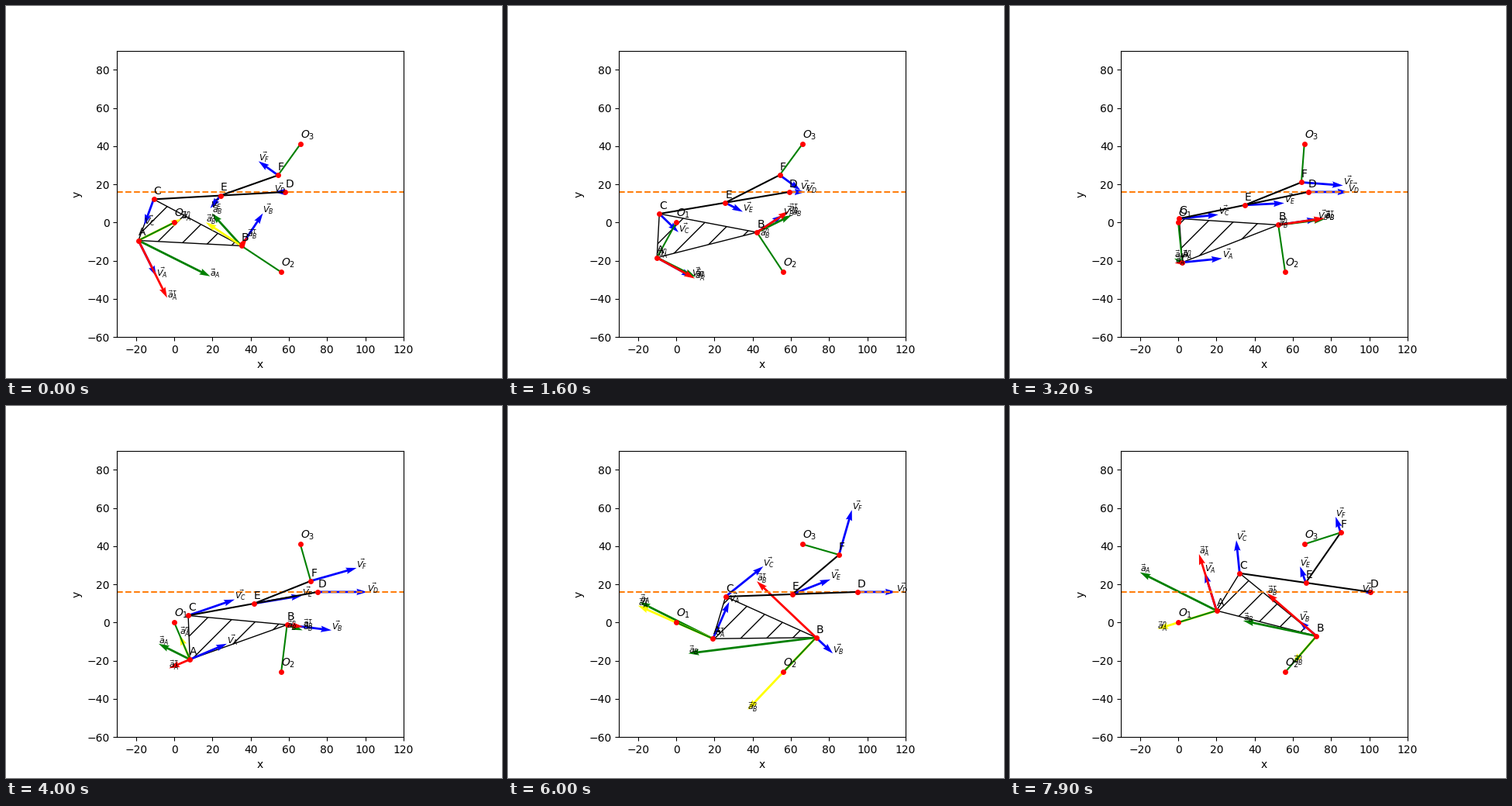
Animation of 640x480 px, one loop 8 s. Source, as a matplotlib script:

```python
import numpy as np
import matplotlib.pyplot as plt
from matplotlib.animation import FuncAnimation

FRAMES, INTERVAL = 80, 100
START, STEP = np.radians(206.6), np.radians(2.16)  # crank angle

O1, O2, O3 = np.array([0, 0]), np.array([56, -26]), np.array([66, 41])
O1A, O2B, O3F = 21, 25, 20
AB, BC, AC = 54, 52, 23
CD, CE, EF = 69, 35, 32
RAIL = 16
ZERO = np.zeros(2)


def joint(p, q, rp, rq):
    """Point at distances rp, rq from p, q, on the left of p -> q."""
    d = q - p
    dist = np.hypot(*d)
    u = d / dist
    along = (rp**2 - rq**2 + dist**2) / (2 * dist)
    side = np.sqrt(rp**2 - along**2)
    return p + along * u + side * np.array([-u[1], u[0]])


def joint_rate(x, p, q, fp, fq, sp=0, sq=0):
    """Velocity (or acceleration) of x held by rigid bars to p and q."""
    dp, dq = x - p, x - q
    return np.linalg.solve([dp, dq], [fp @ dp - sp, fq @ dq - sq])


def project(vec, axis):
    return axis * (vec @ axis) / (axis @ axis)


def solve(i):
    phi = START + STEP * i
    pos, vel, acc = {}, {}, {}

    a = O1A * np.array([np.cos(phi), np.sin(phi)])
    va, wa = np.array([-a[1], a[0]]), -a

    b = joint(a, O2, AB, O2B)
    vb = joint_rate(b, a, O2, va, ZERO)
    wb = joint_rate(b, a, O2, wa, ZERO, (vb - va) @ (vb - va), vb @ vb)

    c = joint(a, b, AC, BC)
    vc = joint_rate(c, a, b, va, vb)

    rise = RAIL - c[1]
    d = np.array([c[0] + np.sqrt(CD**2 - rise**2), RAIL])
    vd = np.array([vc @ (d - c) / (d - c)[0], 0])

    e = c + (d - c) * CE / CD
    ve = vc + (vd - vc) * CE / CD

    f = joint(O3, e, O3F, EF)
    vf = joint_rate(f, O3, e, ZERO, ve)

    pos.update(A=a, B=b, C=c, D=d, E=e, F=f)
    vel.update(A=va, B=vb, C=vc, D=vd, E=ve, F=vf)
    for name, v, w, arm in (("A", va, wa, a - O1), ("B", vb, wb, b - O2)):
        total = np.array([2 * w[0], v[1]])
        normal = project(total, arm)
        acc[name] = total, normal, total - normal
    return pos, vel, acc


fig, ax = plt.subplots(figsize=(6.4, 4.8), dpi=100)
ax.set_aspect("equal")
ax.set(xlim=(-30, 120), ylim=(-60, 90), xlabel="x", ylabel="y")

ax.plot([-30, 120], [RAIL, RAIL], "--", color="C1")
plate = plt.Polygon(np.zeros((3, 2)), fill=False, hatch="/")
ax.add_patch(plate)


def arrows(n, color):
    return ax.quiver([0] * n, [0] * n, [1] * n, [1] * n, color=color,
                     angles="uv", scale_units="xy", scale=1)


speed = arrows(6, "blue")
accel = [arrows(2, color) for color in ("green", "yellow", "red")]

bars = {}
for ends, color in (("CD", "black"), ("EF", "black"),
                    ("1A", "green"), ("2B", "green"), ("3F", "green")):
    bars[ends], = ax.plot([], [], color=color)
dots, = ax.plot([], [], "o", color="red", markersize=4)

pivots = {"1": O1, "2": O2, "3": O3}
for n, p in pivots.items():
    ax.text(p[0], p[1] + 3, f"$O_{n}$")
names = {k: ax.text(0, 0, k) for k in "ABCDEF"}
speed_tags = {k: ax.text(0, 0, rf"$\vec{{V_{k}}}$", fontsize=8)
              for k in "ABCDEF"}
accel_tags = {k: [ax.text(0, 0, rf"$\vec{{a}}_{k}{sup}$", fontsize=8)
                  for sup in ("", "^n", r"^{\tau}")] for k in "AB"}


def set_arrows(quiver, tails, vecs):
    quiver.set_offsets(tails)
    quiver.set_UVC(*np.transpose(vecs))


def update(i):
    pos, vel, acc = solve(i)
    points = {**pos, **pivots}

    plate.set_xy([pos[k] for k in "ABC"])
    for ends, bar in bars.items():
        bar.set_data(*np.transpose([points[k] for k in ends]))
    dots.set_data(*np.transpose(list(points.values())))

    set_arrows(speed, [pos[k] for k in "ABCDEF"], [vel[k] for k in "ABCDEF"])
    for j, quiver in enumerate(accel):
        set_arrows(quiver, [pos[k] for k in "AB"], [acc[k][j] for k in "AB"])

    for k, p in pos.items():
        names[k].set_position(p + [0, 2.5])
        speed_tags[k].set_position(p + vel[k])
    for k, tags in accel_tags.items():
        for tag, vec in zip(tags, acc[k]):
            tag.set_position(pos[k] + vec)
    return []


anim = FuncAnimation(fig, update, frames=FRAMES, interval=INTERVAL,
                     repeat=True, repeat_delay=0)
plt.show()
```
